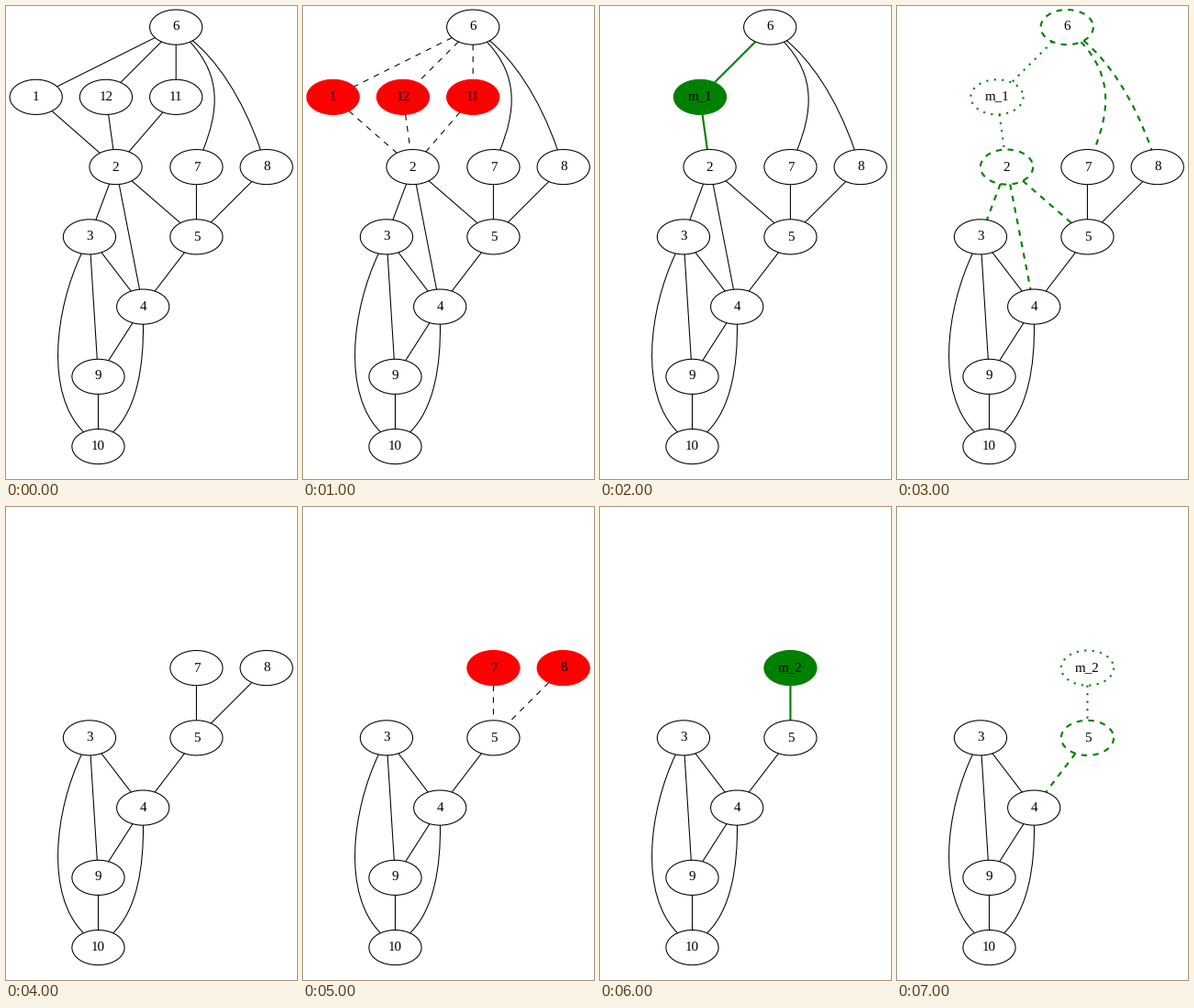
Write a matplotlib script that moves like this. It is 317 px wide and 516 px high and loops after 8 s.

```python
import numpy as np
import matplotlib.pyplot as plt
from matplotlib.animation import FuncAnimation
from matplotlib.patches import PathPatch
from matplotlib.path import Path

W, H, DPI = 317, 516, 64
PX = 72 / DPI            # font/line points per pixel
SCALE = 1.059            # layout units to pixels
RADII = np.array([27, 18]) * SCALE
STEP = 72                # layout distance between ranks and neighbours
GREEN = "#008000"

plt.rcParams["lines.scale_dashes"] = False
plt.rcParams["path.snap"] = False
plt.rcParams["font.family"] = "Liberation Serif"
plt.rcParams["text.hinting"] = "none"

# One row per rank: its nodes and the layout x of the first one
RANKS = [("6", 2 * STEP), ("1 12 11", 0), ("2", 82), ("7 8", 165),
         ("3", 55), ("5", 165), ("4", 110), ("9", 64), ("10", 64)]
SHARED = {"7 8", "5"}    # rows that sit beside the row before them

POS = {}
rank = -1
for names, x0 in RANKS:
    rank += names not in SHARED
    for k, name in enumerate(names.split()):
        layout = np.array([x0 + k * STEP, rank * STEP])
        POS[name] = np.array([32.7, 23.1]) + SCALE * layout
POS["m_1"], POS["m_2"] = POS["12"], POS["7"]

EDGES = [e.split("-") for e in (
    "6-1 6-12 6-11 6-7 6-8 1-2 12-2 11-2 2-3 2-4 2-5 7-5 8-5 "
    "3-4 3-9 3-10 5-4 4-9 4-10 9-10 6-m_1 m_1-2 m_2-5").split()]

# Inner control points of the bent edges
BENDS = {
    ("6", "7"): [(236, 77), (231, 116)],
    ("6", "8"): [(228, 58), (257, 98)],
    ("3", "10"): [(53, 332), (42.5, 423)],
    ("4", "10"): [(150, 392), (143, 439)],
}


def dashes(on, off):
    return 0, (on * SCALE * PX, off * SCALE * PX)


DASH, DOT = dashes(6, 6), dashes(2, 6)
THIN, THICK = SCALE * PX, 2 * SCALE * PX

# Stroke styles of nodes and edges, later states win on an edge
NODE_LOOKS = {
    "plain": dict(fc="none", ec="black", lw=THIN),
    "dashed": dict(fc="none", ec=GREEN, lw=THICK, ls=DASH),
    "dotted": dict(fc="none", ec=GREEN, lw=THICK, ls=DOT),
    "merged": dict(fc=GREEN, ec=GREEN, lw=THIN),
    "removed": dict(fc="red", ec="red", lw=THIN),
}
EDGE_LOOKS = {
    **NODE_LOOKS,
    "merged": dict(ec=GREEN, lw=THICK),
    "removed": dict(ec="black", lw=THIN, ls=DASH),
}
PRIORITY = list(NODE_LOOKS)

CORE = "3 4 5 9 10"
STEPS = [
    {"plain": CORE + " 6 1 12 11 2 7 8"},
    {"plain": CORE + " 6 2 7 8", "removed": "1 12 11"},
    {"plain": CORE + " 6 2 7 8", "merged": "m_1"},
    {"plain": CORE + " 7 8", "dashed": "6 2", "dotted": "m_1"},
    {"plain": CORE + " 7 8"},
    {"plain": CORE, "removed": "7 8"},
    {"plain": CORE, "merged": "m_2"},
    {"plain": "3 4 9 10", "dashed": "5", "dotted": "m_2"},
]

fig = plt.figure(figsize=(W / DPI, H / DPI), dpi=DPI, facecolor="white")
ax = fig.add_axes([0, 0, 1, 1])
ANGLES = np.linspace(0, 2 * np.pi, 121)
RING = RADII * np.column_stack([np.cos(ANGLES), np.sin(ANGLES)])


def rim(name, toward):
    """Point where the line from a node to a point leaves the ellipse."""
    d = np.asarray(toward) - POS[name]
    return POS[name] + d / np.hypot(*(d / RADII))


def draw_edge(a, b, look):
    bend = BENDS.get((a, b))
    if bend:
        path = Path([rim(a, bend[0]), *bend, rim(b, bend[1])],
                    [Path.MOVETO] + [Path.CURVE4] * 3)
    else:
        path = Path([rim(a, POS[b]), rim(b, POS[a])])
    ax.add_patch(PathPatch(path, **{**EDGE_LOOKS[look], "fc": "none"}))


def draw_node(name, look):
    x, y = POS[name]
    ax.add_patch(PathPatch(Path(RING + POS[name], closed=True),
                           **NODE_LOOKS[look]))
    ax.text(x, y + 4, name, size=15 * PX, color="black",
            ha="center", va="baseline")


def draw(i):
    ax.clear()
    ax.set(xlim=(0, W), ylim=(H, 0))
    ax.axis("off")
    looks = {n: look for look, names in STEPS[i].items()
             for n in names.split()}
    for a, b in EDGES:
        if a in looks and b in looks:
            draw_edge(a, b, max(looks[a], looks[b], key=PRIORITY.index))
    for name, look in looks.items():
        draw_node(name, look)
    return []


anim = FuncAnimation(fig, draw, frames=len(STEPS), interval=1000,
                     init_func=lambda: [], repeat=True, repeat_delay=0)
plt.show()
```
